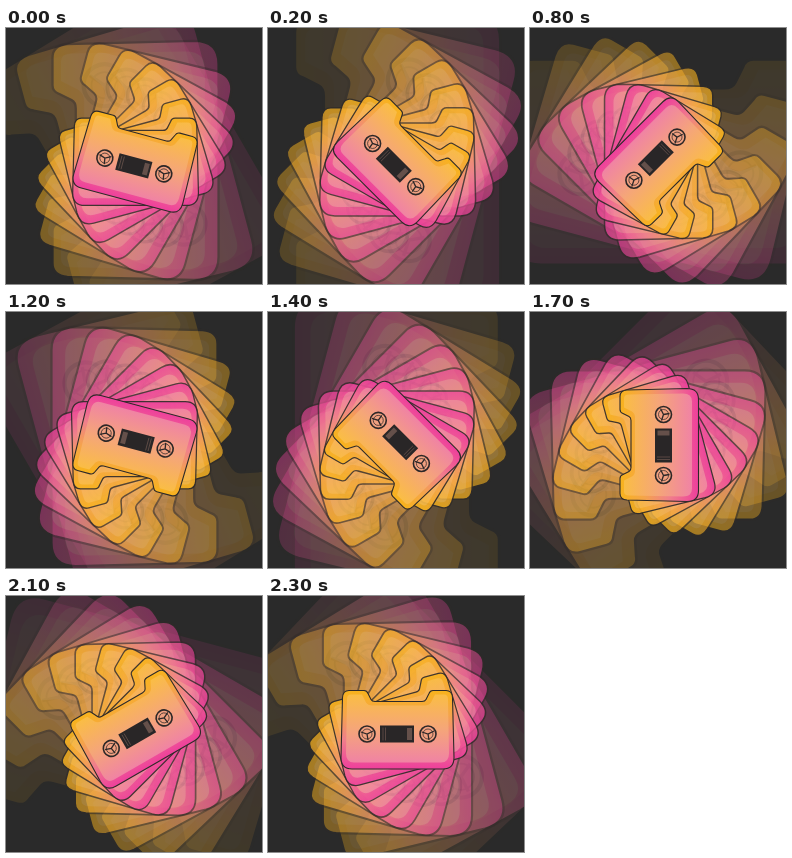
An HTML page for the animation above (2.4 s loop, 256 by 256 pixels).

```html
<!DOCTYPE html>
<html lang="en">
<head>
<meta charset="utf-8">
<title>Spinning cassette</title>
<style>
  html, body { margin: 0; width: 100%; height: 100%; overflow: hidden; background: #2a2a2a; }
  svg { display: block; width: 100%; height: 100%; }
</style>
</head>
<body>
<svg viewBox="0 0 256 256">
  <defs>
    <linearGradient id="shell" x1="0" y1="0" x2="0" y2="1">
      <stop offset="0" stop-color="#f8b31c"/>
      <stop offset=".3" stop-color="#f5a548"/>
      <stop offset=".62" stop-color="#f0808a"/>
      <stop offset="1" stop-color="#ee3f9c"/>
    </linearGradient>
    <linearGradient id="face" x1="0" y1="0" x2="0" y2="1">
      <stop offset="0" stop-color="#fabd45"/>
      <stop offset=".5" stop-color="#f5a678"/>
      <stop offset="1" stop-color="#f083a4"/>
    </linearGradient>
    <g id="reel" stroke="#2c2727" fill="none">
      <circle r="8" fill="#f0a080" stroke-width="1.6"/>
      <circle r="5" stroke-width=".7"/>
      <path d="M-6 -2L0 0L6 -3M0 0L1 6" stroke-width="1.3"/>
    </g>
    <g id="cassette">
      <path fill="url(#shell)" stroke="#2e2a28" stroke-width="1.1" stroke-linejoin="round"
        d="M-48 -39H-33Q-30 -39 -29 -36L-26 -30Q-25 -28 -22 -28H25Q28 -28 29 -30L32 -36Q33 -39 36 -39H49
           Q55 -39 55.500 -32L57 28Q57 39.500 46 39.500H-45Q-56 39.500 -56 28L-54.500 -32Q-54 -39 -48 -39Z"/>
      <path fill="url(#face)"
        d="M-46 -35H-35L-31 -27Q-29 -24 -25 -24H28Q32 -24 34 -27L38 -35H47Q51 -35 51 -30L52 24
           Q52 33 44 33H-43Q-51 33 -51 24L-50 -30Q-50 -35 -46 -35Z"/>
      <use href="#reel" x="-30" y="4.5"/>
      <use href="#reel" x="31" y="4.5"/>
      <rect x="-17" y="-4" width="34" height="17" fill="#292627"/>
      <path d="M-14 -2V11M-11.500 -2V11" stroke="#65504a" stroke-width=".8"/>
      <rect x="10" y="-1.500" width="5" height="12" fill="#65504a"/>
    </g>
  </defs>
  <rect width="256" height="256" fill="#2a2a2a"/>
  <g id="trail" transform="translate(129 133.5)"></g>
</svg>
<script>
  const SVG_NS = 'http://www.w3.org/2000/svg';
  const COUNT = 10, STEP_MS = 100, STEPS = 24, TURN = 360 / STEPS, GROWTH = 1.113;
  const trail = document.getElementById('trail');

  // Larger, fainter copies lag behind the cassette; farthest first.
  const copies = Array.from({ length: COUNT }, (_, i) => {
    const lag = COUNT - 1 - i;
    const node = document.createElementNS(SVG_NS, 'use');
    node.setAttribute('href', '#cassette');
    node.setAttribute('opacity', 1 - lag / COUNT);
    trail.append(node);
    return { node, lag };
  });

  function draw(time) {
    const step = Math.floor(time / STEP_MS) % STEPS;
    for (const { node, lag } of copies) {
      const angle = (step + 1 - lag) * TURN;
      node.setAttribute('transform', `rotate(${angle}) scale(${GROWTH ** lag})`);
    }
  }

  function tick() {
    draw(performance.now());
    requestAnimationFrame(tick);
  }
  tick();
</script>
</body>
</html>
```
